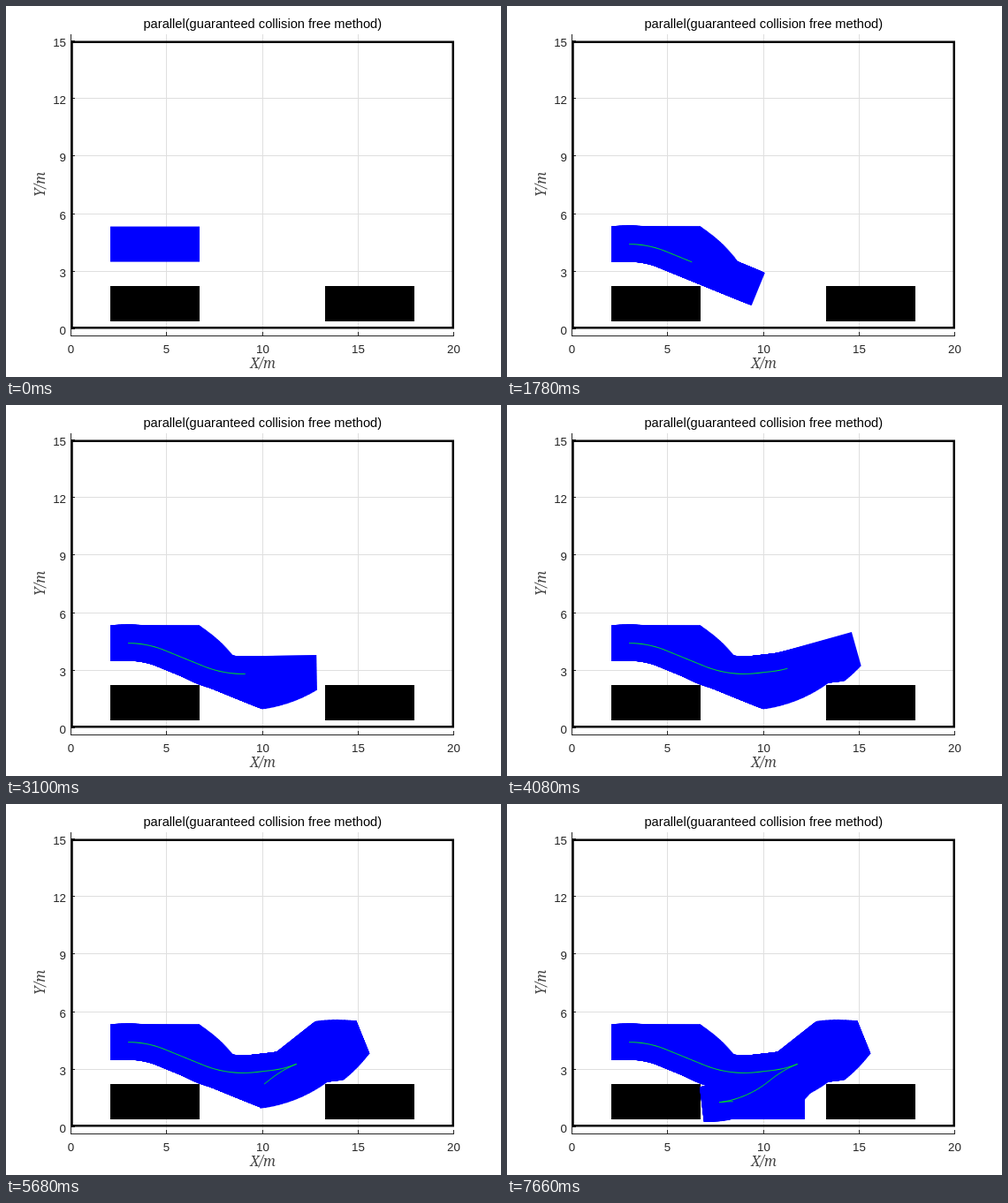
An HTML page with a canvas for the animation above (8.72 s loop, 560x420 px).

```html
<!DOCTYPE html>
<html>
<head>
<meta charset="utf-8">
<style>
  html, body { margin: 0; width: 100%; height: 100%; overflow: hidden; background: #fff; }
  canvas { display: block; }
</style>
</head>
<body>
<canvas id="stage" width="560" height="420"></canvas>
<script>
const ctx = document.getElementById('stage').getContext('2d');
const LOOP = 8720, STEP = 20, SPEED = 0.9636; // ms, ms, px per step
const REAR = 20, FRONT = 81, HALF = 20;       // car extents around the rear axle

// Each move: steps, direction, then arcs as [length px, turn in degrees]
const moves = [
  { steps: 228, dir: 1, arcs: [[42.6, 22.2], [47, 0], [60.2, -28.7], [18, 0], [29.8, -15.5]] },
  { steps: 126, dir: -1, arcs: [[34.1, -16.3], [5.7, 0], [60, 31.3]] },
  { steps: 29, dir: 1, arcs: [[15.5, 7]] }
];

// Distance covered with equal ramps up to and down from SPEED
function travel(t, total, length) {
  const ramp = total - length / SPEED;
  if (t < ramp) return SPEED * t * t / (2 * ramp);
  if (t < total - ramp) return SPEED * (t - ramp / 2);
  return length - SPEED * (total - t) ** 2 / (2 * ramp);
}

function drive(start, move, distance) {
  let { x, y, a } = start;
  for (const [length, degrees] of move.arcs) {
    const part = Math.min(distance, length);
    const turn = degrees * Math.PI / 180 * part / length;
    const chord = turn ? part * Math.sin(turn / 2) / (turn / 2) : part;
    x += move.dir * chord * Math.cos(a + turn / 2);
    y += move.dir * chord * Math.sin(a + turn / 2);
    a += turn;
    distance -= part;
  }
  return { x, y, a };
}

const poses = [{ x: 138, y: 269.6, a: 0 }];
for (const move of moves) {
  const start = poses[poses.length - 1];
  const length = move.arcs.reduce((sum, arc) => sum + arc[0], 0);
  for (let i = 1; i <= move.steps; i++)
    poses.push(drive(start, move, travel(i, move.steps, length)));
}

function line(x1, y1, x2, y2, color) {
  ctx.strokeStyle = color;
  ctx.lineWidth = 1;
  ctx.beginPath();
  ctx.moveTo(x1, y1);
  ctx.lineTo(x2, y2);
  ctx.stroke();
}

function text(str, x, y, font, align, color = '#262626') {
  ctx.font = font;
  ctx.textAlign = align;
  ctx.fillStyle = color;
  ctx.fillText(str, x, y);
}

const SANS = '"Liberation Sans", Arial, sans-serif';
const MATH = 'italic 15.5px "Noto Serif", serif';

function drawAxes() {
  ctx.fillStyle = '#fff';
  ctx.fillRect(0, 0, 560, 420);
  const xs = [0, 1, 2, 3, 4].map(i => Math.floor(73.3 + i * 108.4) + 0.5);
  const ys = [0, 1, 2, 3, 4, 5].map(i => Math.floor(365.2 - i * 65.1) + 0.5);
  xs.slice(1, 4).forEach(x => line(x, 32, x, 374, '#dfdfdf'));
  ys.slice(1, 5).forEach(y => line(73, y, 507, y, '#dfdfdf'));
  line(73.5, 32, 73.5, 374, '#262626');
  line(73, 373.5, 507, 373.5, '#262626');
  xs.forEach((x, i) => {
    line(x, 369, x, 374, '#262626');
    text(i * 5, x, 393, '13.33px ' + SANS, 'center');
  });
  ys.forEach((y, i) => {
    line(73, y, 78, y, '#262626');
    text(i * 3, 68, y + 6, '13.33px ' + SANS, 'right');
  });
  text('parallel(guaranteed collision free method)', 290.3, 25, '14.67px ' + SANS, 'center', '#000');
  text('X/m', 290.5, 410, MATH, 'center', '#444');
  ctx.save();
  ctx.translate(44, 202);
  ctx.rotate(-Math.PI / 2);
  text('Y/m', 0, 0, MATH, 'center', '#444');
  ctx.restore();
}

function drawObstacles() {
  ctx.strokeStyle = ctx.fillStyle = '#000';
  ctx.lineWidth = 2.5;
  ctx.strokeRect(74.5, 40.75, 431.25, 323.5);
  ctx.fillRect(118, 317, 101, 40);
  ctx.fillRect(361, 317, 101, 40);
}

function drawSweep(trail) {
  ctx.fillStyle = '#00f';
  for (const { x, y, a } of trail) {
    ctx.save();
    ctx.translate(x, y);
    ctx.rotate(a);
    ctx.fillRect(-REAR, -HALF, REAR + FRONT, 2 * HALF);
    ctx.restore();
  }
  if (trail.length < 2) return;
  ctx.strokeStyle = '#0f0';
  ctx.lineWidth = 1;
  ctx.beginPath();
  trail.forEach(p => ctx.lineTo(p.x, p.y));
  ctx.stroke();
}

let begin;
function frame(now) {
  begin ??= now;
  const step = Math.floor((now - begin) % LOOP / STEP);
  drawAxes();
  drawObstacles();
  drawSweep(poses.slice(0, step + 1));
  requestAnimationFrame(frame);
}
requestAnimationFrame(frame);
</script>
</body>
</html>
```
